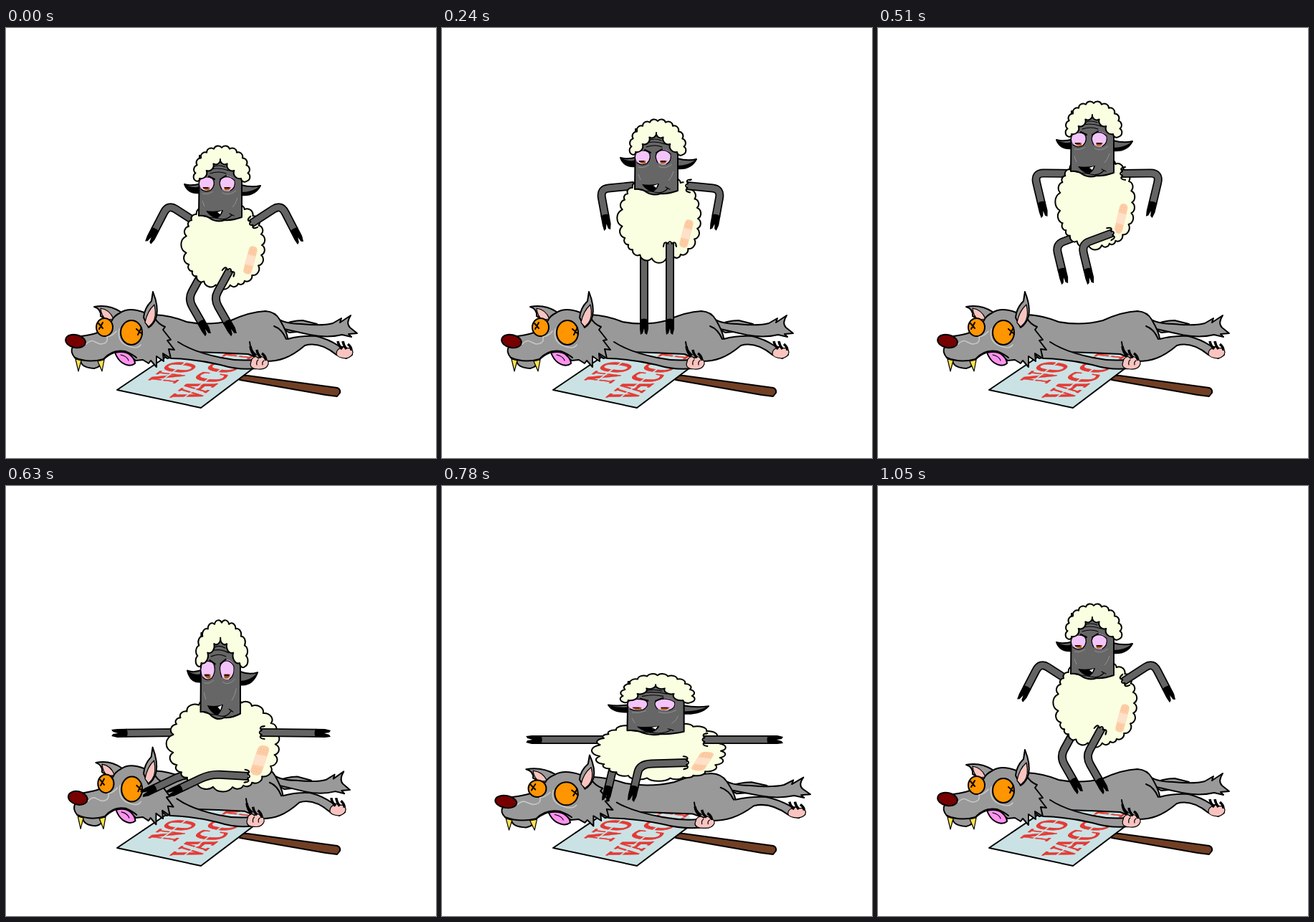
An HTML page for the animation above (1.08 s loop, 600 px wide and 600 px high).

```html
<!DOCTYPE html>
<html lang="en">
<head>
<meta charset="utf-8">
<title>Bouncing sheep</title>
<style>
  html, body { margin: 0; width: 100%; height: 100%; overflow: hidden; background: #fff; }
  svg { display: block; width: 100vw; height: 100vh; }
  path, ellipse { vector-effect: non-scaling-stroke; }
  .ink { stroke: #000; stroke-width: 2; stroke-linejoin: round; stroke-linecap: round; }
  .thin { stroke-width: 1.2; }
  .line { fill: none; }
  .fur { fill: #999; }
  .wool { fill: #faffe1; }
  .pink { fill: #f9c4c0; }
  .orange { fill: #ff9500; }
  .lilac { fill: #f3c4fa; }
  .face { fill: #666; }
  .claw { fill: none; stroke: #000; stroke-width: 3.5; }
  .soft { fill: none; stroke: #c8c8c8; stroke-width: 1.6; stroke-linecap: round; }
  .crease { fill: none; stroke: #929292; stroke-width: 1; }
  .stencil { font: bold 57px "Liberation Serif", "Noto Serif", serif; fill: #e43a34; stroke: #e43a34; stroke-width: 1.5; }
</style>
</head>
<body>
<svg viewBox="0 0 600 600">
  <g id="sign">
    <path class="ink" fill="#713f24" d="M322 485L337 485 462 502Q467 504 466 509L462 514 446 512 326 491Z"/>
    <path fill="#cbe2e5" d="M155 505L230 452 340 450 350 471 341 478 272 530Z"/>
    <path class="ink line" d="M229 455L155 505 272 530 350 471"/>
    <text class="stencil" transform="matrix(.41 -.32 .98 .12 235 496)">NO</text>
    <text class="stencil" transform="matrix(.41 -.32 .98 .12 265 520)">VACCINE</text>
    <path stroke="#cbe2e5" stroke-width="1.6" d="M217 492L262 458M247 517L330 453"/>
  </g>

  <g id="wolf">
    <!-- far leg, tail -->
    <path class="ink fur" d="M380 416Q398 408 414 408L434 413 428 422 395 425Z"/>
    <path class="ink fur" d="M376 403Q387 413 412 413Q442 416 456 412L468 405 466 411 481 401Q474 412 480 418L490 426 478 427 482 431 469 428Q448 433 424 428L384 419Z"/>
    <!-- torso -->
    <path class="ink fur" d="M207 400Q230 401 252 410Q284 416 314 408Q340 396 362 395Q376 396 382 407Q393 426 393 434Q412 429 433 430Q450 434 465 444L480 448 483 456 475 461 461 456Q438 437 417 443C396 461 380 465 363 465L338 455Q300 453 262 452L225 461 200 440Z"/>
    <path class="ink line" d="M374 416Q385 420 391 434M340 438Q341 450 349 456"/>
    <!-- hind paw -->
    <path class="ink pink thin" d="M466 447Q471 443 475 447Q482 445 484 452Q484 459 474 461Q462 460 461 455Q461 449 466 447Z"/>
    <path class="claw" d="M463 437Q464 443 469 448M470 437Q471 443 475 448M477 441Q482 445 482 450"/>
    <!-- front leg and paw -->
    <path class="fur" d="M240 438Q261 452 300 460Q323 465 346 463L350 475Q326 478 299 470Q266 462 228 461Z"/>
    <path class="ink line" d="M240 438Q261 452 300 460Q323 465 346 463M350 475Q326 478 299 470Q266 462 231 461"/>
    <path class="ink pink thin" d="M343 462Q348 456 352 461Q358 456 361 462Q367 463 366 469Q363 477 352 476Q341 476 341 469Z"/>
    <path class="claw" d="M341 444Q342 453 348 458M350 449Q351 456 356 460M357 454Q362 457 363 464"/>
    <path class="ink line thin" d="M350 470Q349 465 352 463M358 470Q357 466 360 464"/>
    <!-- head -->
    <path class="ink fur" d="M147 410L132 402Q133 392 123 389Q143 385 160 396L160 408Z"/>
    <path class="pink ink thin" d="M132 391Q145 393 150 406L140 407Q133 402 132 391Z"/>
    <path class="ink fur" d="M105 430Q120 428 128 425L148 408Q150 402 160 397Q172 389 193 397L208 405Q212 413 222 417L219 421 230 435 225 436 235 449 227 448 230 461 219 454 220 465 210 458 210 473 202 464 199 468 191 463 181 464Q168 453 153 452Q140 457 135 464Q133 473 123 475Q105 474 104 464L96 460Q89 452 93 445Z"/>
    <ellipse class="ink orange" cx="137.500" cy="417.500" rx="11.500" ry="12.500"/>
    <path class="ink" fill="#ff93ef" d="M152 453Q166 450 173 456Q180 462 180 468Q173 474 162 467Q156 463 152 453Z"/>
    <path class="ink line" d="M96 460Q115 468 136 462Q148 448 166 451Q176 455 182 460"/>
    <path class="ink line thin" d="M160 456Q169 458 171 464"/>
    <path class="ink thin" fill="#ffe34e" d="M97 462L105 464 101 479ZM128 465L137 463 134 479Z"/>
    <ellipse class="ink" cx="97" cy="437" rx="14" ry="9" transform="rotate(12 97 437)" fill="#700"/>
    <path class="soft" d="M112 441Q119 434 124 438L131 441Q143 441 141 431Q150 429 154 423M158 420Q154 440 174 445Q184 448 188 442"/>
    <ellipse class="ink orange" cx="175" cy="425" rx="15" ry="17"/>
    <path class="ink line" d="M129 412L135 419M135 411L130 420M182 420L190 427M189 418L184 428"/>
    <path class="ink fur" d="M192 404Q193 391 203 381L205 368Q213 388 210 402Q207 413 199 418Z"/>
    <path class="ink pink thin" d="M194 411Q197 395 207 386Q211 403 204 412L199 417Z"/>
  </g>

  <g id="farArm"></g>
  <g id="farLeg"></g>
  <g id="body">
    <path class="ink wool" id="fleece"/>
    <g transform="translate(341 324) rotate(15)">
      <path fill="#fdcda6" d="M-6-14Q-6-20 0-20T6-14V14Q6 20 0 20T-6 14Z"/>
      <path fill="#ffe0c8" d="M-6-7H6V7H-6Z"/>
      <path stroke="#f3b184" stroke-width="1.2" stroke-dasharray="1 3" d="M-3-15H4M-3-11H4M-3 11H4M-3 15H4"/>
    </g>
  </g>
  <g id="nearArm"></g>
  <g id="nearLeg"></g>
  <g id="head">
    <path class="ink face" d="M271 217Q258 221 248 218Q253 232 270 230ZM327 219Q342 223 354 220Q346 235 327 233Z"/>
    <path d="M249 219Q262 224 270 221V230Q255 232 249 219ZM328 229Q342 229 353 221Q345 235 328 233Z"/>
    <path class="ink face" d="M269 178L268 262Q278 261 284 266Q294 272 304 268Q314 269 328 264V178Z"/>
    <path class="ink line thin" d="M278 199Q294 193 310 199M284 203Q296 199 306 203M287 194Q296 190 305 194"/>
    <ellipse class="lilac" cx="279" cy="217.500" rx="10" ry="10"/>
    <ellipse class="lilac" cx="308" cy="217" rx="11" ry="10.500"/>
    <path class="ink line thin" d="M270 210Q279 206 288 210Q292 219 285 226Q278 230 271 225M300 225Q294 214 301 209Q311 205 318 213Q320 223 312 227"/>
    <path class="ink line" d="M282 207L290 211M298 211L306 206"/>
    <path fill="#a95a1c" d="M273 222H283V226Q277 228 273 222ZM303 222H313Q311 228 304 226Z"/>
    <path fill="#301000" d="M274 222H281V224H274ZM304 222H311V224H304Z"/>
    <path class="crease" d="M273 231Q281 233 288 228M301 230Q310 235 320 227M273 241L276 249M322 237Q320 245 315 250"/>
    <path d="M278 255Q290 257 302 254Q301 261 293 266Q283 263 278 255Z"/>
    <path class="ink line thin" d="M271 262Q283 265 292 265Q306 270 314 261M311 259L317 262"/>
    <path fill="#fff" d="M294 257L300 255 298 260Z"/>
    <path class="ink wool" id="curls"/>
  </g>
</svg>
<script>
const LOOP = 1080, STEP = 30;
const el = id => document.getElementById(id);
const range = (n, f) => Array.from({ length: n }, (_, i) => f(i));
const power = (v, p) => Math.sign(v) * Math.abs(v) ** p;

// Closed outline of round bumps through clockwise points.
function cloud(points) {
  let [px, py] = points.at(-1);
  let d = `M${px} ${py}`;
  for (const [x, y] of points) {
    const r = Math.hypot(x - px, y - py) * .56;
    d += `A${r} ${r} 0 0 1 ${x} ${y}`;
    [px, py] = [x, y];
  }
  return d + 'Z';
}

const fleece = range(25, i => {
  const a = i / 25 * 2 * Math.PI + .06 * Math.sin(i * 5);
  return [304 + 53 * power(Math.cos(a), .85), 303 + 56 * power(Math.sin(a), .85)];
});
const crown = range(13, i => {
  const a = (165 + i * 17.5) * Math.PI / 180;
  return [300 + 36.5 * Math.cos(a), 204 + 37 * Math.sin(a)];
});
const fringe = range(7, i => {
  const v = 1 - i / 3;
  return [298 + 29 * v, 183 + 27 * Math.abs(v) ** 1.3];
});
el('fleece').setAttribute('d', cloud(fleece));
el('curls').setAttribute('d', cloud([...crown, ...fringe]));

// Key poses; the right arm and near leg are given, the others follow from them.
const crouch = { at: 0, chin: 268, head: [1, 1], fleece: [1, 1], shoulder: 273,
  hand: [411, 299], bend: 40, hip: [312, 338], knee: [290, 378], foot: [318, 427], wolf: 1 };
const stand = { ...crouch, at: 240, chin: 231, shoulder: 220,
  hand: [379, 281], bend: 38, hip: [318, 300], knee: [318, 360] };
const leap = { ...stand, at: 510, chin: 206, fleece: [.95, 1.07], shoulder: 203,
  hand: [379, 263], bend: 45, hip: [327, 286], knee: [284, 302], foot: [297, 356] };
const slam = { at: 630, chin: 323, head: [.925, 1.31], fleece: [1.35, 1.07], shoulder: 344,
  hand: [452, 345], bend: 0, hip: [338, 405], knee: [285, 402], foot: [226, 430], wolf: .966 };
const squash = { ...slam, at: 780, chin: 346, head: [1.32, .81], fleece: [1.6, .68], shoulder: 354,
  hand: [475, 354], hip: [342, 386], knee: [276, 388], foot: [264, 439], wolf: 1.081 };
const tuck = { ...slam, at: 900, chin: 313, head: [1.18, .905], fleece: [1.35, .81], shoulder: 318,
  hand: [434, 354], bend: 17, hip: [348, 372], knee: [264, 395], foot: [362, 401] };
const poses = [crouch, stand, leap, slam, squash, tuck, { ...crouch, at: 1050 }];

const mix = (a, b, k) => Array.isArray(a) ? a.map((v, i) => mix(v, b[i], k)) : a + (b - a) * k;

function poseAt(t) {
  const next = poses.findIndex(p => p.at > t);
  if (next < 0) return crouch;
  const a = poses[next - 1], b = poses[next];
  const u = (t - a.at) / (b.at - a.at);
  const k = a === leap ? u ** 3 : u * u * (3 - 2 * u);
  const pose = {};
  for (const name in a) pose[name] = mix(a[name], b[name], k);
  if (a === slam) {
    // The blow flattens both animals further before they spring back.
    const blow = Math.sin(Math.PI * u);
    pose.wolf += .21 * blow;
    pose.chin += 30 * blow;
    pose.fleece = [pose.fleece[0] + .25 * blow, pose.fleece[1] - .25 * blow];
    pose.head = [pose.head[0] + .25 * blow, pose.head[1] - .3 * blow];
  }
  return pose;
}

const degrees = ([x, y], [x2, y2]) => Math.atan2(y2 - y, x2 - x) * 180 / Math.PI - 90;

function limb(id, start, joint, tip, ruffled) {
  const reach = Math.hypot(tip[0] - joint[0], tip[1] - joint[1]);
  const ankle = mix(joint, tip, Math.max(.3, 1 - 19 / reach));
  const d = `M${start}L${mix(start, joint, .75)}Q${joint} ${mix(joint, tip, .22)}L${ankle}`;
  const ruffle = `<path class="ink wool" d="M-9 5Q-8-4-3 1Q0-5 3 1Q8-4 9 5L5-5H-5Z" stroke-dasharray="32 99"
    transform="translate(${start}) rotate(${degrees(start, joint)})"/>`;
  el(id).innerHTML =
    `<path class="line" stroke="#000" stroke-width="12" d="${d}"/>
     <path class="line" stroke="#646464" stroke-width="8.6" d="${d}"/>
     <path d="M-6-1Q0-4 6-1V12L4 20 1 18 0 11-2 18-5 20-6 12Z"
       transform="translate(${ankle}) rotate(${degrees(joint, tip)})"/>` + (ruffled ? ruffle : '');
}

function place(id, x, y, [sx, sy], ox, oy) {
  el(id).setAttribute('transform',
    `translate(${x} ${y}) scale(${sx} ${sy}) translate(${-ox} ${-oy})`);
}

function draw(t) {
  const p = poseAt(t);
  place('wolf', 193, 500, [p.wolf, p.wolf ** -.75], 193, 500);
  place('body', 303.5, p.chin, p.fleece, 303.5, 268);
  place('head', 302, p.chin, p.head, 301, 268);

  const shoulder = [303 + 39 * p.fleece[0], p.shoulder];
  const [dx, dy] = [p.hand[0] - shoulder[0], p.hand[1] - shoulder[1]];
  const out = p.bend / Math.hypot(dx, dy);
  const elbow = [shoulder[0] + .4 * dx + dy * out, shoulder[1] + .4 * dy - dx * out];
  const axis = 305 - 14 * (p.fleece[0] - 1);
  const mirror = ([x, y]) => [2 * axis - x, y];
  const behind = ([x, y]) => [x - 36, y];

  const arm = [shoulder, elbow, p.hand], leg = [p.hip, p.knee, p.foot];
  limb('nearArm', ...arm, true);
  limb('farArm', ...arm.map(mirror), false);
  limb('nearLeg', ...leg, true);
  limb('farLeg', ...leg.map(behind), false);
}

const start = performance.now();
function tick() {
  const t = (performance.now() - start) % LOOP;
  draw(Math.floor(t / STEP) * STEP);
  requestAnimationFrame(tick);
}
tick();
</script>
</body>
</html>
```
